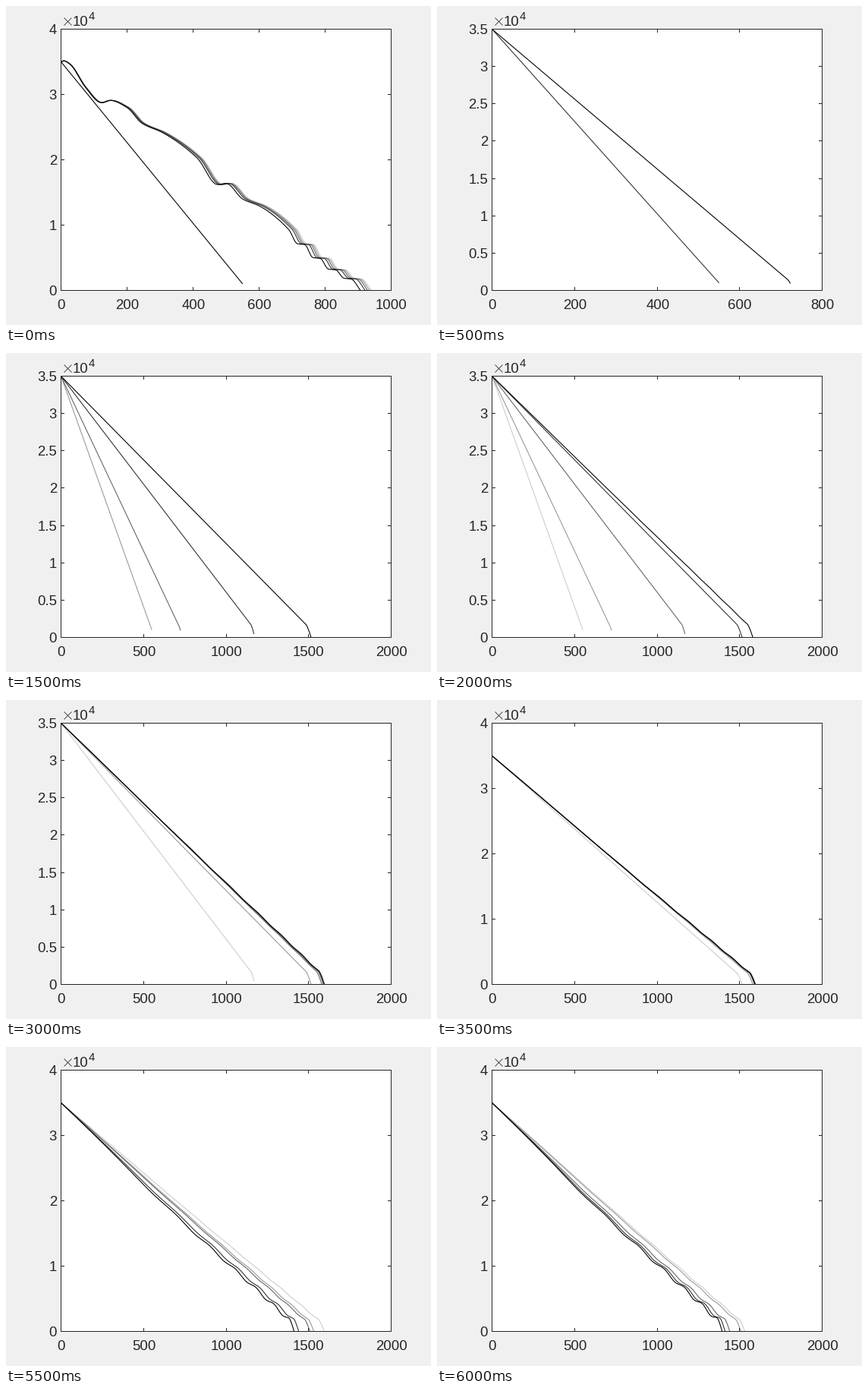
Recreate the animation shown at these times as a matplotlib script. Size 560x420 px, loop 6500 ms.

```python
import numpy as np
import matplotlib.pyplot as plt
from matplotlib.animation import FuncAnimation

W, H, DPI = 560, 420, 100
LEFT, RIGHT, TOP, BOTTOM = 72.5, 507.5, 30.5, 374.5  # pixel centres
INK = "#262626"
PX = 72 / DPI  # points per pixel
FONT = 18.67 * PX
TRAIL = 5
STEPS = 13

fig = plt.figure(figsize=(W / DPI, H / DPI), dpi=DPI, facecolor="#f0f0f0")
ax = fig.add_axes([0, 0, 1, 1])


def flight(end, rough=0, knee=1.75, stop=1):
    """Straight descent from 35 thousand to a knee, then a steep drop.

    rough adds a sag and ripples that quicken along the way;
    stop cuts the path at that share of its length.
    """
    bend = 0.979
    s = np.append(np.linspace(0, bend, 200), np.linspace(bend, 1, 20)[1:])
    s = s[s <= stop + 1e-9]
    t = np.minimum(s / bend, 1)
    ripple = t * np.sin(2 * np.pi * (6 * t**2.5 + 0.2))
    sag = 1.8 * np.sin(np.pi * t) ** 2
    y = 35 + (knee - 35) * t + rough * (ripple - sag)
    drop = np.maximum(s - bend, 0) / (1 - bend)
    return end * s, y * (1 - drop**1.3)


def smooth(keys, n=8):
    """Monotone curve through key points, level at every peak and dip."""
    x, y = np.array(keys, dtype=float).T
    h = np.diff(x)
    d = np.diff(y) / h
    a, b = d[:-1], d[1:]
    inner = np.where(a * b > 0, 2 * a * b / (a + b + 1e-12), 0)
    m = np.concatenate([d[:1], inner, d[-1:]])
    t = np.linspace(0, 1, n, endpoint=False)[:, None]
    ease = t * t * (3 - 2 * t)
    ys = (y[:-1] + ease * np.diff(y)
          + h * (t * (1 - t) ** 2 * m[:-1] - t * t * (1 - t) * m[1:]))
    xs = x[:-1] + h * t
    return np.append(xs.T.ravel(), x[-1]), np.append(ys.T.ravel(), y[-1])


def steps_down(count=4):
    """Ledges near the ground, each followed by a short fall."""
    for i in range(count):
        x, y = 716 + 47 * i, 7.15 - 2.3 * i + 0.18 * i * i
        yield x, y
        yield x + 22, y - 0.12


wave_x, wave_y = smooth([
    (0, 35), (8, 35.15), (28, 34.6), (74, 31.1), (122, 28.75), (148, 29.1),
    (200, 28), (245, 25.6), (310, 24.1), (412, 20.3), (474, 16.2),
    (500, 16.4), (550, 14), (604, 12.85), (690, 9.3), *steps_down(), (907, 0)])
old_runs = [(wave_x * (1 + 0.016 * k**0.6), wave_y) for k in (4, 3, 2, 1, 0)]

runs = [
    flight(562, knee=1, stop=0.979),
    flight(731, knee=1.5, stop=0.99),
    flight(1174, stop=0.9965),
    flight(1515),
    flight(1580, 0.03),
    flight(1590, 0.05),
    flight(1596, 0.07),
    flight(1594, 0.07),
    flight(1531, 0.1),
    flight(1508, 0.1),
    flight(1440, 0.2),
    flight(1412, 0.28),
    flight(1394, 0.33),
]


def scales(step):
    """x limit, x step, y limit and y step (y in thousands)."""
    xmax = {0: 1000, 1: 800, 2: 1200}.get(step, 2000)
    xstep = 500 if xmax == 2000 else 200
    tall = step == 0 or step >= 7
    return (xmax, xstep, 40, 10) if tall else (xmax, xstep, 35, 5)


def stroke(xs, ys, color=INK, width=1.0, z=4):
    ax.plot(xs, ys, color=color, lw=width * PX, zorder=z, snap=False,
            solid_capstyle="butt", solid_joinstyle="miter")


def label(x, y, s, ha="left", size=FONT):
    ax.text(x, y, s, ha=ha, va="baseline", fontsize=size, color=INK,
            family="Liberation Sans")


def to_px(x, y, xmax, ymax):
    return (LEFT + (RIGHT - LEFT) * x / xmax,
            BOTTOM - (BOTTOM - TOP) * y / ymax)


def crisp(v):
    return np.floor(v) + 0.5


def draw_frame(xmax, xstep, ymax, ystep):
    ax.add_patch(plt.Rectangle((LEFT, TOP), RIGHT - LEFT, BOTTOM - TOP,
                               fc="white", ec="none", zorder=1))
    stroke([LEFT, RIGHT, RIGHT, LEFT, LEFT], [TOP, TOP, BOTTOM, BOTTOM, TOP])
    for v in range(0, xmax + 1, xstep):
        x = crisp(to_px(v, 0, xmax, ymax)[0])
        stroke([x, x], [BOTTOM, BOTTOM - 4.5])
        stroke([x, x], [TOP, TOP + 4.5])
        label(x + 0.3, 399.3, str(v), "center")
    for v in range(0, ymax + 1, ystep):
        y = crisp(to_px(0, v, xmax, ymax)[1])
        stroke([LEFT, LEFT + 4.5], [y, y])
        stroke([RIGHT, RIGHT - 4.5], [y, y])
        label(67, y + 6.5, f"{v / 10:g}", "right")
    # thin multiplication sign, then 10 to the 4th
    for y0, y1 in ((15.5, 25.5), (25.5, 15.5)):
        stroke([76.5, 86.5], [y0, y1], width=0.8)
    label(88, 26.5, "10")
    label(109, 17.5, "4", size=FONT * 0.8)


def draw(step):
    ax.clear()
    ax.set(xlim=(0, W), ylim=(H, 0))
    ax.axis("off")
    xmax, xstep, ymax, ystep = scales(step)
    draw_frame(xmax, xstep, ymax, ystep)

    groups = [runs[max(0, step + 1 - TRAIL):step + 1]]
    if step == 0:
        groups.insert(0, old_runs)
    for group in groups:
        for age, run in reversed(list(enumerate(reversed(group)))):
            stroke(*to_px(*run, xmax, ymax), str(0.2 * age), 1.1, z=3)
    return []


anim = FuncAnimation(fig, draw, frames=STEPS, interval=500,
                     init_func=lambda: [], repeat=True, repeat_delay=0)
plt.show()
```
